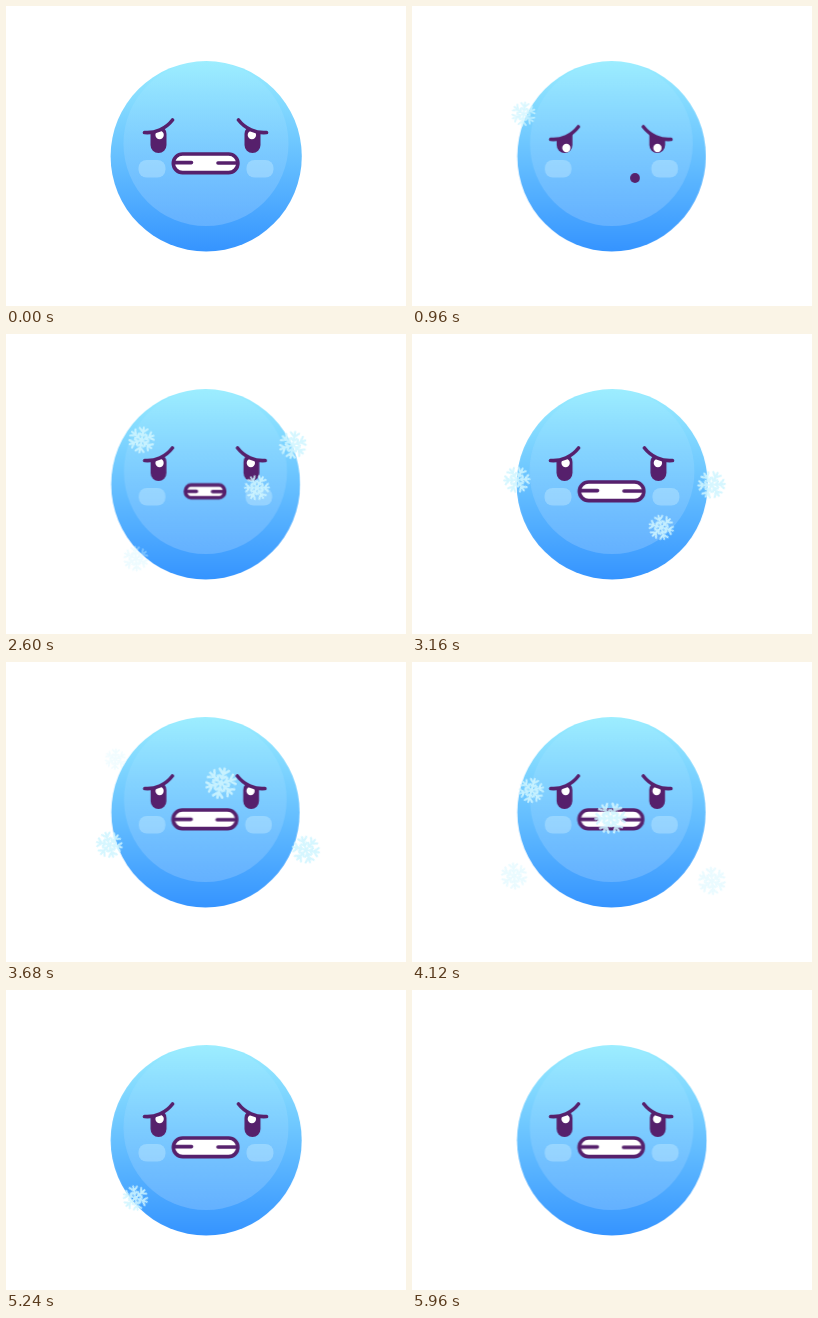
An HTML page that plays this animation: 400 by 300 pixels, repeating every 6 s.

```html
<!DOCTYPE html>
<html lang="en">
<head>
<meta charset="utf-8">
<title>Shivering face</title>
<style>
  html, body { margin: 0; width: 100%; height: 100%; overflow: hidden; background: #fff; }
  svg { display: block; width: 100vw; height: 100vh; }

  .shiver { transform-origin: 200px 150px; animation: shiver 75ms ease-in-out infinite alternate; }
  @keyframes shiver { to { transform: translateX(-.7px) scaleX(.985); } }

  .line { fill: none; stroke: #56206c; stroke-width: 3.6; stroke-linecap: round; stroke-linejoin: round; }
  .dark { fill: #56206c; }

  .lid, .glint, .teeth, .lips { animation: 6s ease-in-out infinite; }
  .lid { animation-name: lid; }
  .glint { fill: #fff; animation-name: glint; }
  @keyframes lid {
    0%, 10.7%, 40.7%, 100% { transform: none; }
    14.7%, 36% { transform: translateY(6.8px); }
  }
  @keyframes glint {
    0%, 10.7%, 40.7%, 100% { transform: none; }
    14.7%, 36% { transform: translate(.8px, 13px); }
  }

  /* wide chattering teeth shrink away while the small blowing mouth is shown */
  .teeth { transform-origin: 199.5px 157.5px; animation-name: teeth; }
  .teeth * { vector-effect: non-scaling-stroke; }
  .teeth .bite { animation: bite 75ms ease-in-out infinite alternate; }
  @keyframes bite { to { transform: translateY(.7px); } }
  @keyframes teeth {
    0%, 10.7% { transform: none; opacity: 1; }
    12.7% { transform: scale(.15, .3); opacity: 1; }
    12.8%, 41.4% { transform: scale(.15, .3); opacity: 0; }
    41.5% { transform: scale(.15, .3); opacity: 1; }
    45%, 100% { transform: none; opacity: 1; }
  }
  .lips { transform-origin: 224px 172px; animation-name: lips; }
  @keyframes lips {
    0%, 12.3%, 41.4%, 100% { transform: scale(0); }
    14.7%, 38.7% { transform: none; }
  }

  .puff { fill: #d8f7ff; fill-opacity: .78; opacity: 0; animation: puff 6s linear infinite; }
  @keyframes puff {
    0%, 21.6% { transform: translate(231px, 171px) scale(.15); opacity: 0; }
    22.6% { opacity: 1; }
    28.67% { transform: translate(277px, 156px); opacity: 1; }
    32% { transform: translate(296px, 149px) scale(1.03); opacity: .6; }
    35.8%, 100% { transform: translate(301px, 147px) scale(1.05); opacity: 0; }
  }

  .fall { animation: fall 6s linear var(--at) infinite both; }
  .fall use {
    opacity: 0;
    animation: sway 6s ease-in-out var(--at) infinite both,
               spin 6s linear var(--at) infinite both,
               fade 6s linear var(--at) infinite both;
  }
  @keyframes fall {
    0% { transform: translateY(var(--y)); }
    34%, 100% { transform: translateY(calc(var(--y) + var(--drop, 145px))); }
  }
  @keyframes sway {
    0% { translate: var(--x0); }
    17% { translate: var(--x1); }
    34%, 100% { translate: var(--x2); }
  }
  @keyframes spin { 34%, 100% { rotate: 60deg; } }
  @keyframes fade {
    0% { opacity: 0; scale: calc(.75 * var(--size, 1)); }
    5% { opacity: .88; scale: var(--size, 1); }
    28.5% { opacity: .88; }
    34%, 100% { opacity: 0; scale: var(--size, 1); }
  }
</style>
</head>
<body>
<svg viewBox="0 0 400 300">
  <defs>
    <linearGradient id="skin" x2="0" y2="1">
      <stop stop-color="#99edff"/>
      <stop offset="1" stop-color="#3594ff"/>
    </linearGradient>
    <linearGradient id="shine" x2="0" y2="1">
      <stop stop-color="#fff" stop-opacity=".04"/>
      <stop offset="1" stop-color="#fff" stop-opacity=".18"/>
    </linearGradient>
    <path id="brow" d="M138.5 126.5C149 127.5 160 122.5 166.5 114"/>
    <clipPath id="open">
      <path class="lid" d="M130 126.5H138.5C149 127.5 160 122.5 166.5 114V160H130Z"/>
    </clipPath>
    <g id="eye" clip-path="url(#open)">
      <rect class="dark" x="144.5" y="120" width="16" height="27" rx="8"/>
    </g>
    <path id="arm" d="M0 0V-12M-3.8-11L0-7.3L3.8-11M-2.6-6L0-3.6L2.6-6"/>
    <g id="flake" fill="none" stroke="#cff5ff" stroke-width="2" stroke-linecap="round">
      <use href="#arm"/>
      <use href="#arm" transform="rotate(60)"/>
      <use href="#arm" transform="rotate(120)"/>
      <use href="#arm" transform="rotate(180)"/>
      <use href="#arm" transform="rotate(240)"/>
      <use href="#arm" transform="rotate(300)"/>
    </g>
  </defs>

  <g class="shiver">
    <ellipse cx="200.2" cy="150.3" rx="95.6" ry="95.2" fill="url(#skin)"/>
    <circle cx="200" cy="137.6" r="82.5" fill="url(#shine)"/>
    <g fill="#d5f3ff" fill-opacity=".35">
      <rect x="132.5" y="154" width="27" height="17.5" rx="8"/>
      <rect x="240.5" y="154" width="27" height="17.5" rx="8"/>
    </g>

    <use href="#eye"/>
    <use href="#eye" transform="translate(399 0) scale(-1 1)"/>
    <circle class="glint" cx="153.6" cy="129" r="4.2"/>
    <circle class="glint" cx="245.9" cy="129" r="4.2"/>
    <g class="line lid">
      <use href="#brow"/>
      <use href="#brow" transform="translate(399 0) scale(-1 1)"/>
    </g>

    <g class="teeth line">
      <rect x="167.3" y="148" width="64.6" height="18.6" rx="9.3" fill="#fff"/>
      <path class="bite" d="M169 156.6H185.5M212 157H229.5"/>
    </g>
    <circle class="lips dark" cx="224" cy="172" r="5"/>
  </g>

  <g class="puff">
    <circle cx="-7" cy="-8" r="13"/>
    <circle cx="9" cy="-7" r="13"/>
    <circle cx="-10" cy="6" r="13.5"/>
    <circle cx="12" cy="8" r="12"/>
  </g>

  <g class="fall" style="--at:.7s; --y:89.5px; --x0:109px; --x1:128px; --x2:130px"><use href="#flake"/></g>
  <g class="fall" style="--at:1.6s; --y:82.5px; --x0:247px; --x1:251px; --x2:248px"><use href="#flake"/></g>
  <g class="fall" style="--at:2.25s; --y:81px; --x0:146px; --x1:104px; --x2:102px; --size:1.05"><use href="#flake"/></g>
  <g class="fall" style="--at:2.25s; --y:86px; --x0:282.5px; --x1:300px; --x2:300px; --size:1.1"><use href="#flake"/></g>
  <g class="fall" style="--at:3.2s; --y:83px; --drop:162px; --x0:229px; --x1:198px; --x2:190px; --size:1.25"><use href="#flake"/></g>
  <g class="fall" style="--at:3.58s; --y:90px; --x0:109px; --x1:128px; --x2:130px"><use href="#flake"/></g>
</svg>
</body>
</html>
```
